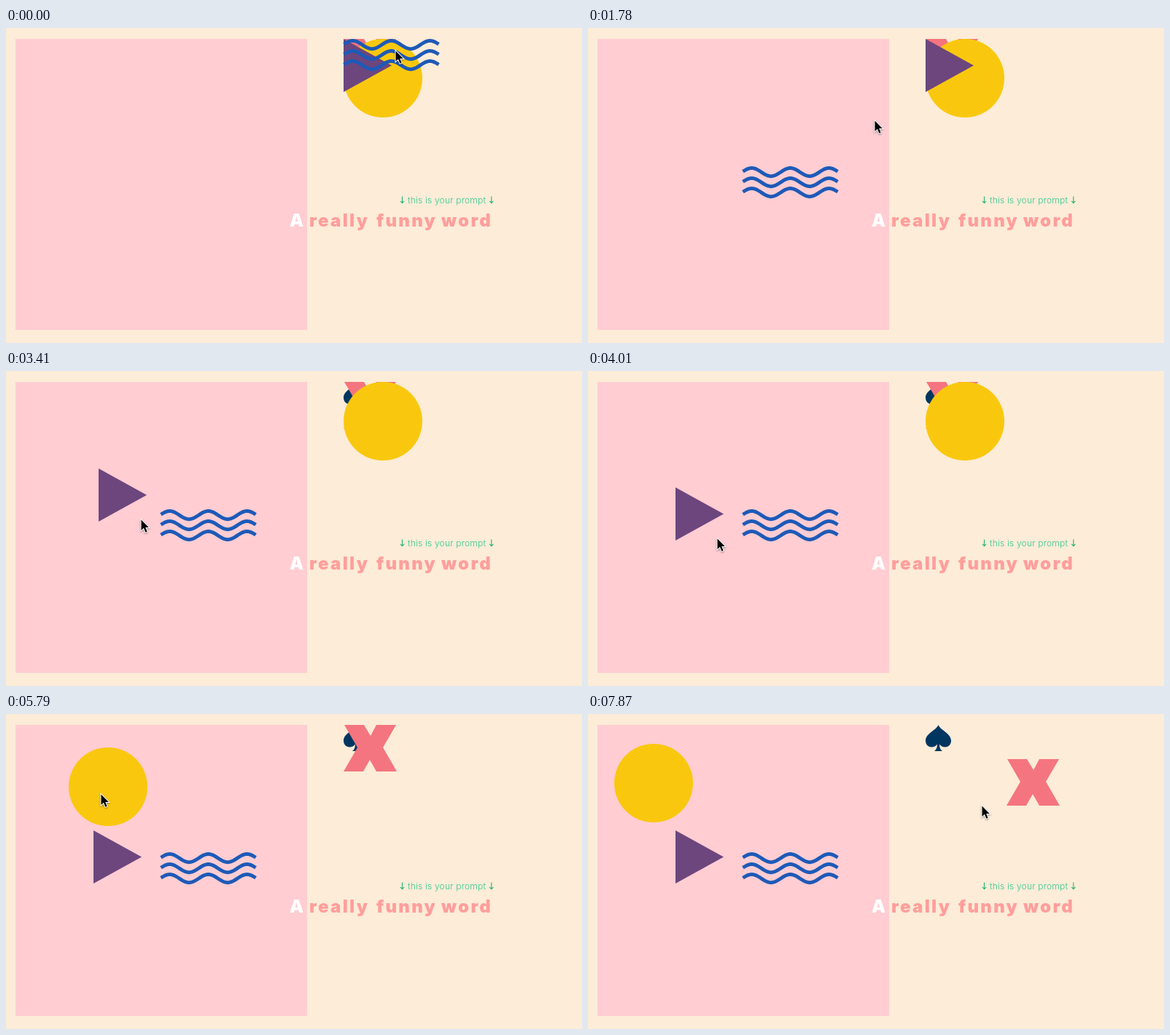
Animation of 790x433 px, one loop 8000 ms. Source, as an HTML page:

```html
<!DOCTYPE html>
<html lang="en">
<head>
<meta charset="utf-8">
<title>Shape collage</title>
<style>
  html, body { margin: 0; width: 100%; height: 100%; overflow: hidden; background: #fcecd8; }
  svg { display: block; width: 790px; height: 433px; }
  text { font-family: Inter, sans-serif; }
  .hint { font-size: 12px; font-weight: 300; letter-spacing: .2px; fill: #2fc98c; }
  .arrow { fill: none; stroke: #22b573; stroke-width: 1.1; }
  .prompt { font-size: 24px; font-weight: 900; letter-spacing: 2.3px; fill: #ff9e9c; }
  #waves { fill: none; stroke: #1d5ab8; stroke-width: 4.9; }
  #pointer { filter: drop-shadow(0 1px 1px rgba(0, 0, 0, .4)); }
</style>
</head>
<body>
<svg viewBox="0 0 790 433">
  <rect x="13" y="15" width="400" height="400" fill="#ffcdd2"/>

  <text class="hint" x="551" y="240.5">this is your prompt</text>
  <path class="arrow" d="M543.5 231.5v9m-2.6-2.7l2.6 2.8 2.6-2.8M665.8 231.5v9m-2.6-2.7l2.6 2.8 2.6-2.8"/>
  <text class="prompt" y="273.4"><tspan x="389" fill="#fff">A</tspan> <tspan x="416">really</tspan> <tspan x="508">funny</tspan> <tspan x="597">word</tspan></text>

  <path transform="translate(463 15)" fill="#003660"
    d="M17.5 0C20 7 35 12 35 21.5C35 27 31.5 30.5 27 30.5C23.5 30.5 20.8 29 19 26.5C19 31 20.5 34.5 23 36H12C14.5 34.5 16 31 16 26.5C14.2 29 11.5 30.5 8 30.5C3.5 30.5 0 27 0 21.5C0 12 15 7 17.5 0Z"/>
  <path id="cross" fill="#f4757f" d="M1 0H28L37 15L45 0H72L54 31L73 64H45L36 48L27 64H0L19 31Z"/>
  <circle id="disc" cx="54" cy="54" r="54" fill="#f9c80e"/>
  <path id="triangle" fill="#6d467e" d="M0 0L66 36.5L0 73Z"/>
  <path id="waves"/>
  <path id="pointer" fill="#000" stroke="#fff" stroke-width="2" paint-order="stroke"
    d="M.5.5V15l3.4-3.2 2.5 5.9 2.2-1-2.4-5.600h4.600z"/>
</svg>

<script>
const LOOP = 8000;
const TICKS = 54;
const LEAD = 0.07; // how far, in ticks, the pointer runs ahead of a held shape
const home = { x: 463, y: 15 };
const start = { x: 534, y: 31 };

// Pointer moves, in ticks; a held shape travels along
const move = (from, to, x, y, held) => ({ from, to, x, y, held });
const moves = [
  move(0.5, 2, 511, 42, "waves"),
  move(2, 8, 283, 206, "waves"),
  move(9, 12, 393, 127),
  move(12, 15, 520, 85),
  move(16, 19, 211, 179, "triangle"),
  move(19, 22, 154, 209, "triangle"),
  move(22, 24, 194, 202, "triangle"),
  move(24, 27, 177, 230, "triangle"),
  move(28, 33, 509, 79),
  move(34, 35, 377, 144, "disc"),
  move(35, 39, 132, 110, "disc"),
  move(39, 42, 82, 105, "disc"),
  move(42, 46, 505, 50),
  move(47, 50, 616, 97, "cross"),
  move(51, 53, 540, 126)
];

const tickTime = tick => Math.floor((tick * 148.4 + 3.5) / 10) * 10;
const easeOut = u => 1 - (1 - u) ** 2;

function pathAt(tick) {
  let at = start;
  for (const next of moves) {
    if (tick <= next.from) break;
    const u = easeOut(Math.min(1, (tick - next.from) / (next.to - next.from)));
    at = { x: at.x + (next.x - at.x) * u, y: at.y + (next.y - at.y) * u };
  }
  return at;
}

function pointerAt(tick) {
  const dragging = moves.some(m => m.held && m.from <= tick && tick < m.to);
  return pathAt(dragging ? tick + LEAD : tick);
}

function shapeAt(id, tick) {
  const drag = moves.filter(m => m.held === id);
  const grabbed = drag[0].from;
  const released = drag[drag.length - 1].to;
  const a = pathAt(grabbed);
  const b = pathAt(Math.min(released, Math.max(grabbed, tick)));
  return { x: home.x + b.x - a.x, y: home.y + b.y - a.y };
}

function play(id, positionAt) {
  const frames = Array.from({ length: TICKS + 1 }, (_, tick) => {
    const { x, y } = positionAt(tick);
    return {
      offset: tick < TICKS ? tickTime(tick) / LOOP : 1,
      transform: `translate(${Math.round(x)}px, ${Math.round(y)}px)`,
      easing: "step-end"
    };
  });
  document.getElementById(id).animate(frames, { duration: LOOP, iterations: Infinity });
}

function wavePath(top) {
  const points = Array.from({ length: 66 }, (_, i) => {
    const x = 0.5 + i * 2;
    const y = top + 8.1 - 5.6 * Math.cos(2 * Math.PI * (x - 65.5) / 53);
    return `${x} ${y.toFixed(2)}`;
  });
  return "M" + points.join("L");
}

document.getElementById("waves").setAttribute("d", [0, 14, 28].map(wavePath).join(""));
for (const id of ["waves", "triangle", "disc", "cross"]) play(id, tick => shapeAt(id, tick));
play("pointer", pointerAt);
</script>
</body>
</html>
```
